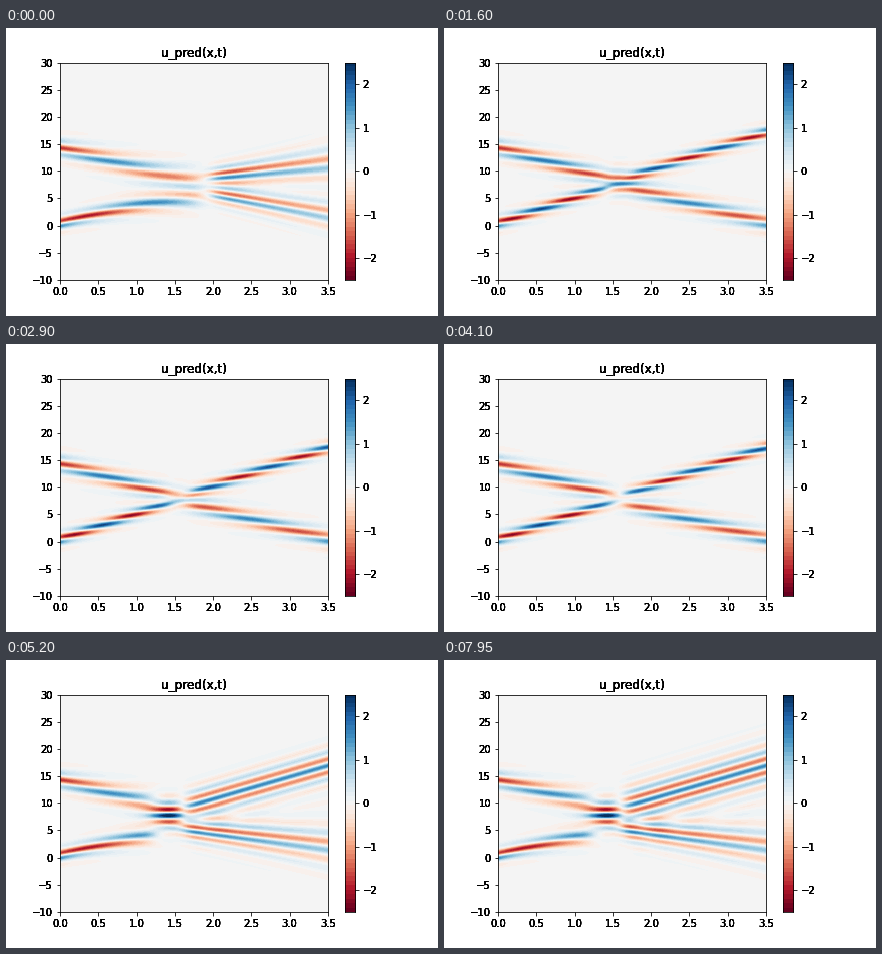
Recreate the animation shown at these times as a matplotlib script. Size 432x288 px, loop 8 s.

```python
import numpy as np
import matplotlib.pyplot as plt
from matplotlib.animation import FuncAnimation
from matplotlib.colors import ListedColormap

FRAMES, STEP = 160, 50
CUT = 4.7                       # seconds, hard switch to the second run
W, H = 268, 217
T = ((np.arange(W) + 0.5) / W * 3.5).astype(np.float32)[None, :]
X = (-10 + (np.arange(H) + 0.5) / H * 40).astype(np.float32)[:, None]


def mix(a, b, q):
    return a + (b - a) * q


def sech(z):
    return 1 / np.cosh(np.clip(z, -30, 30))


def gate(z):
    return 1 / (1 + np.exp(-z / 0.06))


def packet(s, pos, speed, k, height, width, rate=0, phase=0, spread=0, bend=0):
    """Travelling wave group; rate and phase are in units of pi."""
    grow = np.exp(spread * s)
    y = (X - pos - speed * s + bend * s * s) / grow
    return height / grow * sech(y / width) * np.cos(k * y + np.pi * (rate * s + phase))


def incoming(q):
    up = packet(T, 0.45, mix(4.0, 4.75, q), 2.4, 2.25, 0.62, mix(1.15, 2.65, q),
                0.53, mix(0.3, 0, q), mix(0.75, 0, q))
    down = packet(T, 14.2, mix(-3.6, -3.9, q), 2.1, 1.75, 0.88, mix(-1.4, -1.67, q),
                  1.0, mix(0.22, 0, q))
    return up + down


def collide(before, after, hit, height):
    """Join both halves around a standing wave of the given height."""
    gap = 0.06 + 0.05 * height
    pulse = height * np.exp(-((T - hit) / (0.12 + 0.04 * height)) ** 2)
    wave = sech((X - 8) / 1.2) * np.cos(np.pi * (X - 7.75) / 1.2)
    return before * gate(hit - gap - T) + after * gate(T - hit - gap) + pulse * wave


def first_run(sec):
    """Blurred fan that settles into two sharp crossing waves."""
    q = 1 - np.exp(-sec / 0.45)
    drift = -0.6 + 0.26 * sec + 1.1 * (1 - q)
    up = packet(T - 2, mix(9.05, 10.2, q), mix(1.5, 4.65, q), mix(3.2, 2.4, q),
                mix(1.9, 2.15, q), mix(0.9, 0.63, q), 2.5 * q, drift, mix(0.42, 0, q))
    down = packet(T - 2, 5.9, mix(-2.5, -3.6, q), mix(3.2, 2.0, q), 1.6, 0.9,
                  -1.6 * q, mix(0.5, 0.75, q), mix(0.33, 0, q))
    return collide(incoming(q), up + down, mix(1.92, 1.57, q),
                   5.4 * q * np.exp(-sec / 1.3))


def second_run(sec):
    """Strong clash that scatters into a fan, slowly widening."""
    q = (sec - CUT) / (8 - CUT)
    up = packet(T - 2, 10.7, 4.07, 2.55, 1.6, mix(1.4, 1.9, q), spread=0.03)
    down = packet(T - 2, 4.75, -1.7, 3.0, 1.6, 1.2, phase=0.5, spread=0.32)
    return collide(incoming(0), up + down, 1.43, 2.8)


def field(sec):
    return first_run(sec) if sec < CUT else second_run(sec)


def label(ax, text, xy, coords, shift, ha, va, size=10):
    # stacked copies give the lettering its heavy edges
    for _ in range(6):
        ax.annotate(text, xy, xycoords=coords, xytext=shift, annotation_clip=False,
                    textcoords="offset points", ha=ha, va=va, fontsize=size)


def minus(v):
    return str(v).replace("-", "\u2212")


def panel(rect, data, extent):
    ax = fig.add_axes(rect)
    im = ax.imshow(data, cmap=cmap, vmin=-2.5, vmax=2.5, origin="lower",
                   extent=extent, aspect="auto", interpolation="nearest")
    ax.tick_params(labelleft=False, labelbottom=False, labelright=False)
    return ax, im


BANDS = 49
colors = plt.get_cmap("RdBu")(np.linspace(0, 1, BANDS))
colors[BANDS // 2, :3] = 0.957
cmap = ListedColormap(colors)

plt.rcParams["font.family"] = "DejaVu Sans"
fig = plt.figure(figsize=(6, 4), dpi=72, facecolor="white")

ax, im = panel([0.125, 0.125, 0.62, 0.755], field(0), (0, 3.5, -10, 30))
ax.set(xticks=np.arange(0, 3.6, 0.5), yticks=range(-10, 31, 5))
label(ax, "u_pred(x,t)", (0.5, 1), "axes fraction", (0, 6), "center", "baseline", 12)
for t in ax.get_xticks():
    label(ax, f"{t:.1f}", (t, -10), "data", (0, -7), "center", "top")
for v in range(-10, 31, 5):
    label(ax, minus(v), (0, v), "data", (-7, 0), "right", "center_baseline")

bar, _ = panel([0.78375, 0.125, 0.02517, 0.755],
               np.linspace(-2.5, 2.5, BANDS)[:, None], (0, 1, -2.5, 2.5))
bar.yaxis.tick_right()
bar.tick_params(labelright=False)
bar.set(xticks=[], yticks=range(-2, 3))
for v in range(-2, 3):
    label(bar, minus(v), (1, v), "data", (7, 0), "left", "center_baseline")


def update(i):
    im.set_data(field(i * STEP / 1000))
    return [im]


anim = FuncAnimation(fig, update, frames=FRAMES, interval=STEP,
                     repeat=True, repeat_delay=0, blit=False)
plt.show()
```
